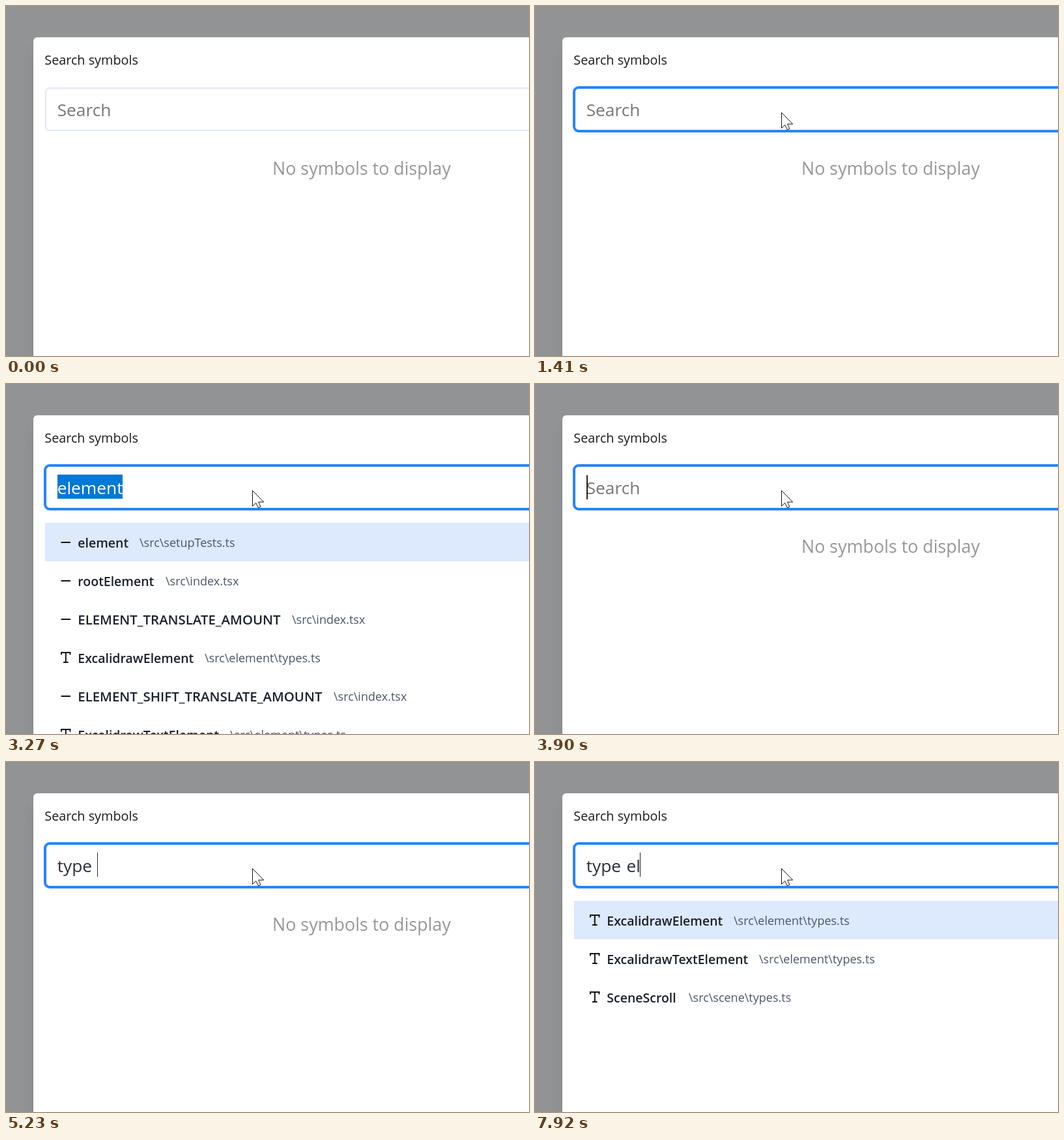
An HTML page that plays this animation: 803x537 px, repeating every 8 s.

```html
<!DOCTYPE html>
<html lang="en">
<head>
<meta charset="utf-8">
<title>Search symbols</title>
<style>
  html, body { margin: 0; width: 100%; height: 100%; overflow: hidden; background: #929395; }
  #stage { position: relative; width: 100%; height: 100%; overflow: hidden; contain: strict; }
  #modal {
    position: absolute; left: 42px; top: 48px; right: -60px; bottom: -60px;
    background: #fff; border-radius: 6px;
    box-shadow: 0 15px 23px -4px rgba(0,0,0,.1), 0 6px 9px -3px rgba(0,0,0,.05);
  }
  svg { position: absolute; left: 0; top: 0; overflow: hidden; }
  text { font-family: "Open Sans", "Noto Sans", sans-serif; white-space: pre; }
  .title { font-size: 19.8px; fill: #1a1a1a; }
  .query { font-size: 26.3px; word-spacing: 1.5px; }
  .empty { font-size: 26.8px; fill: #979797; }
  .name { font-size: 19.5px; font-weight: 600; fill: #1a202c; }
  .caps { font-size: 20.4px; }
  .path { font-size: 18px; fill: #4a5568; }
  .icon { fill: none; stroke: #111; stroke-width: 2; }
</style>
</head>
<body>
<div id="stage">
<div id="modal"></div>
<svg width="803" height="537" viewBox="0 0 803 537">
  <text class="title" x="59.3" y="90">Search symbols</text>
  <rect id="field" fill="#fff"/>
  <rect id="selection" x="79" y="139" width="100" height="37" fill="#0078d7"/>
  <text id="query" class="query" x="78.7" y="169"></text>
  <rect id="caret" y="139" height="37" fill="#222"/>
  <text id="empty" class="empty" x="409" y="259">No symbols to display</text>
  <g id="list"></g>
  <path id="cursor" d="M0 0V24L5.3 19L8.8 26.4L12.4 24.8L9.2 17.6H17.2Z" fill="#fff" stroke="#111" stroke-width="1"/>
</svg>
</div>
<script>
const LOOP = 8000;
const $ = id => document.getElementById(id);

const VALUE_ICON = 'M84.5 243H99';
const TYPE_ICON = 'M85 238.5V235H98.5V238.5M91.8 235V250M88 250H95.6';

// kind, name, path, x of path
const SYMBOLS = {
  element: ['value', 'element', '\\src\\setupTests.ts', 205],
  root: ['value', 'rootElement', '\\src\\index.tsx', 245],
  amount: ['value', 'ELEMENT_TRANSLATE_AMOUNT', '\\src\\index.tsx', 439],
  shift: ['value', 'ELEMENT_SHIFT_TRANSLATE_AMOUNT', '\\src\\index.tsx', 503],
  excalidraw: ['type', 'ExcalidrawElement', '\\src\\element\\types.ts', 305],
  excalidrawText: ['type', 'ExcalidrawTextElement', '\\src\\element\\types.ts', 344],
  exportType: ['type', 'ExportType', '\\src\\scene\\types.ts', 235],
  render: ['type', 'TestRenderFn', '\\src\\tests\\test-utils.ts', 255],
  state: ['type', 'SceneState', '\\src\\scene\\types.ts', 232],
  scroll: ['type', 'SceneScroll', '\\src\\scene\\types.ts', 236],
};

const RESULTS = {
  element: ['element', 'root', 'amount', 'excalidraw', 'shift', 'excalidrawText'],
  types: ['exportType', 'excalidraw', 'excalidrawText', 'render', 'state', 'scroll'],
  filtered: ['excalidraw', 'excalidrawText', 'scroll'],
};

// Each step keeps the values it does not name.
const STEPS = [
  { t: 0, text: '', caret: 0, list: '', selected: false },
  { t: 1010, caret: 79 },
  { t: 1410, caret: 0 },
  { t: 2130, text: 'eleme', caret: 153, list: 'element' },
  { t: 2180, text: 'elemen', caret: 169 },
  { t: 2250, text: 'element', caret: 178 },
  { t: 2710, caret: 0 },
  { t: 3270, selected: true },
  { t: 3900, text: '', caret: 79, list: '', selected: false },
  { t: 5130, text: 'type', caret: 132, list: 'types' },
  { t: 5230, text: 'type ', caret: 140, list: '' },
  { t: 5660, caret: 0 },
  { t: 6160, text: 'type e', caret: 155 },
  { t: 6230, list: 'types' },
  { t: 6300, text: 'type el', caret: 161 },
  { t: 6400, text: 'type ele', caret: 176 },
  { t: 6460, list: 'filtered' },
  { t: 6990, caret: 0 },
  { t: 7450, caret: 176 },
  { t: 7920, text: 'type el', caret: 161 },
];

function rowMarkup(key, index) {
  const [kind, name, path, pathX] = SYMBOLS[key];
  const caps = name === name.toUpperCase() ? ' caps' : '';
  return `<g transform="translate(0 ${index * 59})">
    <path class="icon" d="${kind === 'type' ? TYPE_ICON : VALUE_ICON}"/>
    <text class="name${caps}" x="110.3" y="250.5">${name}</text>
    <text class="path" x="${pathX}" y="250">${path}</text></g>`;
}

function listMarkup(keys) {
  return '<rect x="60" y="213" width="743" height="59" fill="#dde9fd"/>' + keys.map(rowMarkup).join('');
}

function set(el, attrs) {
  for (const name in attrs) el.setAttribute(name, attrs[name]);
}

const show = (el, visible) => set(el, { visibility: visible ? 'visible' : 'hidden' });
const clamp = v => Math.max(0, Math.min(1, v));
const mix = (a, b, k) => a + (b - a) * k;
const mixColor = (a, b, k) => `rgb(${a.map((v, i) => Math.round(mix(v, b[i], k)))})`;

function drawCursor(t) {
  show($('cursor'), t >= 70);
  const step = clamp(Math.floor((t - 70) / 78) / 6);
  const glide = 1 - (1 - step) ** 2;
  const settle = t >= 785 ? 1 : t >= 710 ? 0.5 : 0;
  const x = mix(mix(640, 384, glide), 378, settle);
  const y = mix(mix(448, 172, glide), 163, settle);
  set($('cursor'), { transform: `translate(${Math.round(x) + .5} ${Math.round(y) + .5})` });
}

function drawField(t) {
  const focus = clamp(Math.floor((t - 785) / 75) / 3);
  const idle = t >= 540 ? [203, 210, 226] : [224, 230, 243];
  // The focus ring grows outwards from a fixed inner edge.
  const stroke = mix(2, 4, focus);
  set($('field'), {
    x: 62 - stroke / 2, y: 127 - stroke / 2,
    width: 900, height: 63 + stroke, rx: 5 + stroke / 2,
    stroke: mixColor(idle, [38, 132, 255], focus),
    'stroke-width': stroke,
  });
}

let shownList = null;

function draw(t) {
  const state = Object.assign({}, ...STEPS.filter(step => step.t <= t));
  drawField(t);
  drawCursor(t);

  $('query').textContent = state.text || 'Search';
  set($('query'), { fill: state.selected ? '#fff' : state.text ? '#2b303b' : '#777' });
  show($('selection'), state.selected);

  const atStart = state.caret === 79;
  set($('caret'), { x: state.caret, y: atStart ? 140 : 139, width: atStart ? 2 : 1 });
  show($('caret'), state.caret > 0);

  show($('empty'), !state.list);
  if (state.list !== shownList) {
    $('list').innerHTML = state.list ? listMarkup(RESULTS[state.list]) : '';
    shownList = state.list;
  }
}

const start = performance.now();
function tick(now) {
  draw(Math.max(0, now - start) % LOOP);
  requestAnimationFrame(tick);
}
draw(0);
requestAnimationFrame(tick);
</script>
</body>
</html>
```
